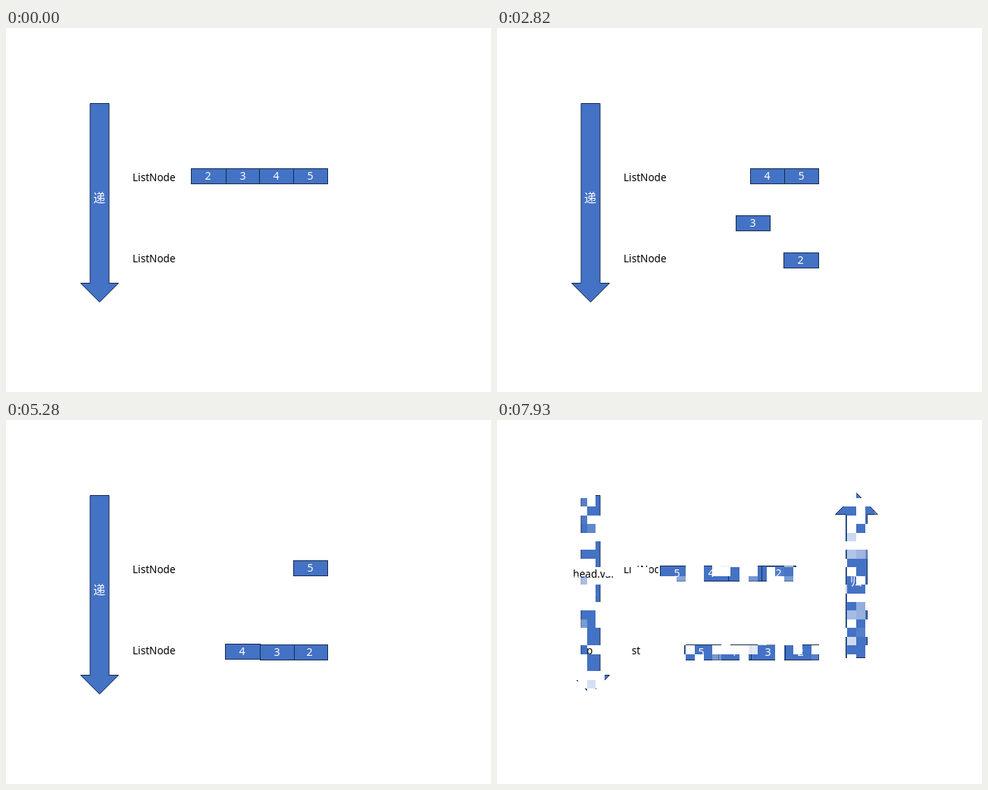
Write an HTML page with a canvas that moves like this. It is 640 by 480 pixels and loops after 7990 ms.

```html
<!DOCTYPE html>
<html lang="zh">
<head>
<meta charset="utf-8">
<title>ListNode recursion</title>
<style>
  html, body { margin: 0; width: 100%; height: 100%; overflow: hidden; background: #fff; }
  canvas { display: block; }
</style>
</head>
<body>
<canvas id="stage" width="640" height="480"></canvas>
<script>
const W = 640, H = 480, LOOP = 7990, STEP = 60;
const FILL = '#4472c4', LINE = '#172c51';
const LATIN = '"Noto Sans", "Open Sans", sans-serif';
const HAN = '300 16px "Noto Sans CJK SC", "Noto Sans CJK", sans-serif';

// Each node slides from the upper row to the lower one.
const MOVE = 1800;
const nodes = [
  { label: '2', from: [244, 185], to: [378, 296], width: 47, start: -2 },
  { label: '3', from: [290, 185], to: [335, 296], width: 46, start: 1875 },
  { label: '4', from: [334, 185], to: [289, 296], width: 47, start: 3649 },
  { label: '5', from: [379, 185], to: [247, 296], width: 46, start: 5476 }
];

const DISSOLVE = { start: 7390, length: 1080, cols: 54, rows: 42, fade: 0.1 };

const clamp = v => Math.min(1, Math.max(0, v));

function ease(u) {
  return u < 0.5 ? 0.5 * (2 * u) ** 2.4 : 1 - 0.5 * (2 - 2 * u) ** 2.4;
}

function text(c, str, x, y, font, color, align) {
  c.font = font;
  c.fillStyle = color;
  c.textAlign = align;
  c.fillText(str, x, y);
}

function label(c, str, x, y, align = 'left') {
  text(c, str, x, y, '13.6px ' + LATIN, '#000', align);
}

function box(c, str, x, y, width = 46) {
  c.fillStyle = FILL;
  c.strokeStyle = LINE;
  c.lineWidth = 1;
  c.fillRect(x, y, width, 21);
  c.strokeRect(x + 0.5, y + 0.5, width - 1, 20);
  text(c, str, x + 22.5, y + 15, '14.2px ' + LATIN, '#fff', 'center');
}

// Block arrow; y runs from the tail over the neck to the tip.
function arrow(c, x, shaft, head, tail, neck, tip, str, textY) {
  c.beginPath();
  c.moveTo(x - shaft, tail);
  c.lineTo(x + shaft, tail);
  c.lineTo(x + shaft, neck);
  c.lineTo(x + head, neck);
  c.lineTo(x, tip);
  c.lineTo(x - head, neck);
  c.lineTo(x - shaft, neck);
  c.closePath();
  c.fillStyle = FILL;
  c.strokeStyle = LINE;
  c.lineWidth = 1;
  c.fill();
  c.stroke();
  text(c, str, x - 0.5, textY, HAN, '#fff', 'center');
}

function clear(c) {
  c.fillStyle = '#fff';
  c.fillRect(0, 0, W, H);
}

function drawDescent(c, t) {
  clear(c);
  arrow(c, 123.5, 12.5, 25, 99.5, 336.5, 361.5, '递', 230);
  label(c, 'ListNode', 167, 202);
  label(c, 'ListNode', 167, 309);
  for (const n of nodes) {
    const p = ease(clamp((t - n.start) / MOVE));
    const [x, y] = n.from.map((a, i) => Math.round(a + (n.to[i] - a) * p));
    box(c, n.label, x, y, n.width);
  }
}

function drawReturn(c) {
  clear(c);
  arrow(c, 474.5, 14, 28, 313.5, 124.5, 96.5, '归', 218);
  label(c, 'head.val', 154, 208, 'right');
  label(c, 'p', 118, 309);
  [215, 260, 305, 349].forEach((x, i) => box(c, String(5 - i), x, 192));
}

function rand(col, row) {
  const s = Math.sin(col * 127.1 + row * 311.7) * 43758.5453;
  return s - Math.floor(s);
}

const ctx = document.getElementById('stage').getContext('2d');
const next = document.createElement('canvas');
next.width = W;
next.height = H;
drawReturn(next.getContext('2d'));

function dissolve(p) {
  const { cols, rows, fade } = DISSOLVE;
  for (let row = 0; row < rows; row++) {
    const y = Math.round(row * H / rows);
    const h = Math.round((row + 1) * H / rows) - y;
    for (let col = 0; col < cols; col++) {
      const alpha = clamp((p - rand(col, row) * (1 - fade)) / fade);
      if (!alpha) continue;
      const x = Math.round(col * W / cols);
      const w = Math.round((col + 1) * W / cols) - x;
      ctx.globalAlpha = alpha;
      ctx.drawImage(next, x, y, w, h, x, y, w, h);
    }
  }
  ctx.globalAlpha = 1;
}

// The picture holds for one step; the step grid shifts late in the loop.
function snap(t) {
  const late = 7570;
  if (t >= late) return late + Math.floor((t - late) / STEP) * STEP;
  return Math.min(7500, Math.floor(t / STEP) * STEP);
}

function render(ms) {
  const t = snap(ms % LOOP);
  drawDescent(ctx, t);
  const p = (t - DISSOLVE.start) / DISSOLVE.length;
  if (p > 0) dissolve(p);
}

let origin;
function tick(now) {
  origin ??= now;
  render(now - origin);
  requestAnimationFrame(tick);
}
render(0);
requestAnimationFrame(tick);
</script>
</body>
</html>
```
